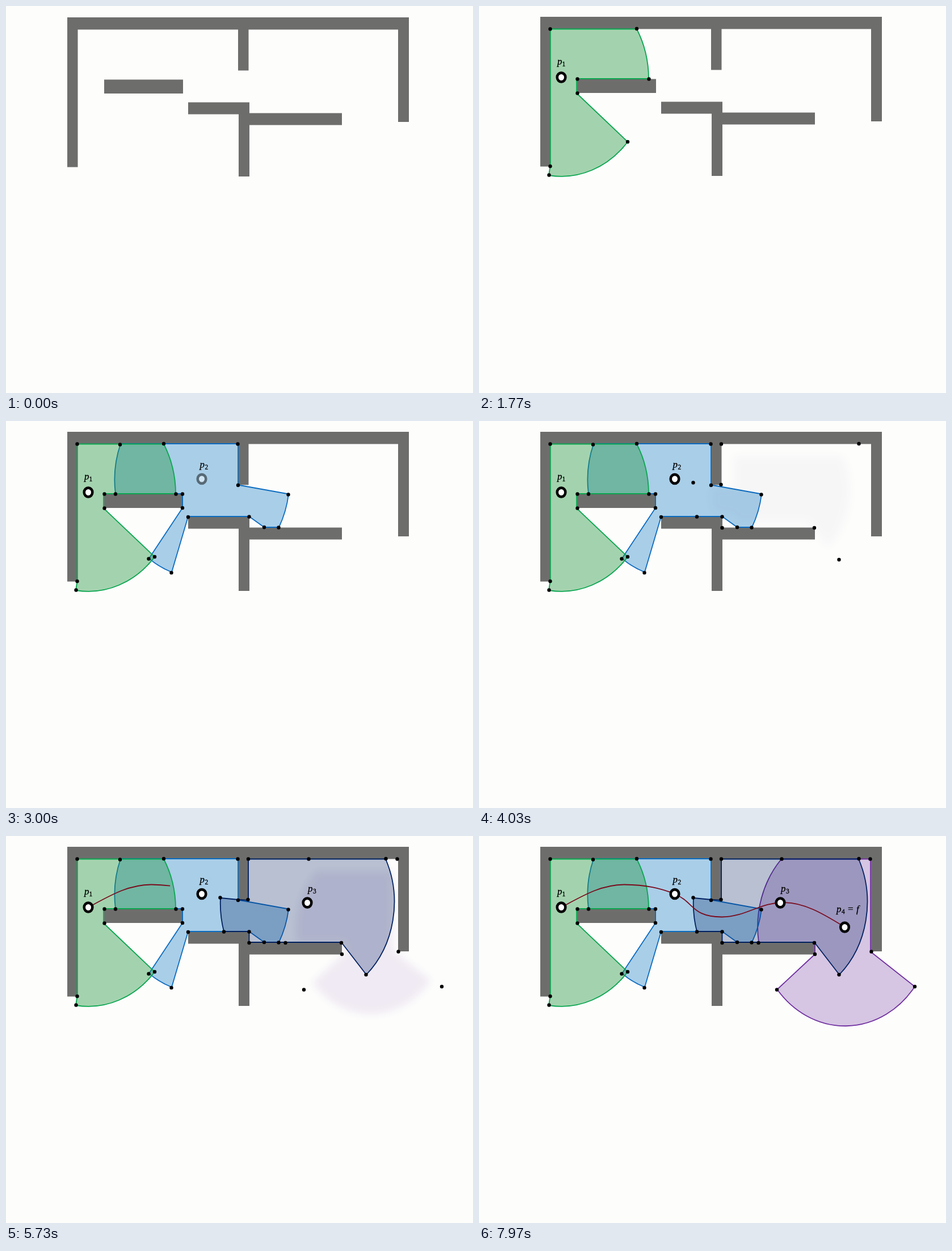
These frames come from a looping animation (823 by 681 pixels, 8000 ms). An HTML page:

```html
<!DOCTYPE html>
<html lang="en">
<head>
<meta charset="utf-8">
<title>Visibility regions along a path</title>
<style>
  /* One clock in ms drives everything */
  @property --t { syntax: '<number>'; inherits: true; initial-value: 0; }
  @keyframes clock { from { --t: 0; } to { --t: 8000; } }

  html, body { margin: 0; width: 100%; height: 100%; overflow: hidden; background: #fdfdfc; }
  svg { display: block; width: 823px; height: 681px; animation: clock 8s linear infinite; }

  /* --s: region starts to grow, --d: its corner dots appear */
  .a { --s: 815; --d: 930; }
  .b { --s: 2380; --d: 1980; }
  .c { --s: 3980; --d: 3580; }
  .d { --s: 5560; --d: 5160; }

  .walls {
    fill: #6d6e6c;
    transform: translateY(calc(1px - 1px * clamp(0, var(--t) - 930, 1)));
  }
  .zone {
    --p: clamp(0, (var(--t) - var(--s)) / 500, 1);
    opacity: min(var(--p), clamp(0, var(--t) - var(--d), 1));
    transform-box: fill-box;
    transform-origin: center;
    transform: scale(calc(.78 + .22 * var(--p)));
    filter: blur(calc((1 - var(--p)) * 12px));
    stroke-width: 1.8;
    stroke-linejoin: round;
    stroke-opacity: clamp(0, var(--p) * 5 - 4, 1);
  }
  .zone.a { fill: rgb(28 148 58 / .4); stroke: #0aa650; }
  .zone.b { fill: rgb(0 112 192 / .33); stroke: #0c6cc0; }
  .zone.c { fill: rgb(0 32 96 / .27); stroke: #002060; }
  .zone.d { fill: rgb(112 48 160 / .27); stroke: #7030a0; }

  .dots {
    opacity: clamp(0, var(--t) - var(--d), 1);
    stroke: #000;
    stroke-width: 6.4;
    stroke-linecap: round;
  }
  .label {
    opacity: clamp(0, (var(--t) - var(--s) - 250) / 390, 1);
    font: italic 17px "Liberation Serif", "Noto Serif", serif;
    stroke: #000;
    stroke-width: .3;
  }
  .label .sub { font-size: 11.5px; font-style: normal; }
  .ring {
    opacity: clamp(0, (var(--t) - var(--s) - 400) / 460, 1);
    fill: #fff;
    stroke: #000;
    stroke-width: 4.6;
  }
  .route {
    fill: none;
    stroke: #7a0a1c;
    stroke-width: 1.8;
    stroke-dasharray: 1 2;
    stroke-dashoffset: calc(1 - clamp(0, (var(--t) - 5560) / 600, 1));
  }
</style>
</head>
<body>
<svg viewBox="0 0 823 681">
  <path class="walls" d="M108 19H710V203H691V40.5H427.500V112.500H409V40.500H126.500V282.500H108Z
    M173 128.500H312V153H173Z M321 168.500H429V187.500H592V208.500H429V299H410V189.500H321Z"/>

  <path class="zone d" d="M533 40.500H690V203.500L768 265A154 174 0 0 1 525.500 270L592 208V187H493A154 174 0 0 1 533 40.500Z"/>
  <path class="zone b" d="M202 40H409V112.500L498 128.500A154 174 0 0 1 481 187H455L428.500 168H321L292 266A154 174 0 0 1 252 242L311 153V128H193A154 174 0 0 1 202 40Z"/>
  <path class="zone c" d="M427 40.500H669A154 174 0 0 1 635 244L591 187H428.500V168H384A154 174 0 0 1 378 109L409 112L427 113Z"/>
  <path class="zone a" d="M125.500 40.500H278A154 175 0 0 1 299 128H172V153.500L262 239A154 175 0 0 1 123 298L125.500 282Z"/>

  <path class="route" pathLength="1" d="M145 125.500C185 104 215 86 256 85.500C295 86 320 92 345 102
    C380 117 374 142 428 142.500C470 142 495 118 531 117.500C570 114 610 139 644 160"/>

  <path class="dots a" d="M125.500 40.500h0M278 40h0M173.500 128.500h0M299.500 128.500h0M173.500 153.500h0M262 239h0M125.500 282h0M123.500 297.500h0"/>
  <path class="dots b" d="M201 41.500h0M408.500 40.500h0M409 113h0M193 128.500h0M311 128.500h0M311 153h0M321 169h0M428.500 168.500h0M455 187h0M480.500 187.500h0M497.500 129.500h0M251.500 242.500h0M291.500 267h0"/>
  <path class="dots c" d="M427 40.500h0M669.500 40h0M426.500 112h0M377.500 108.500h0M384 168.500h0M428.500 188h0M591 188h0M634.500 244h0"/>
  <path class="dots d" d="M533.500 40.500h0M689.500 40.500h0M492.500 188h0M592 208h0M691.500 203.500h0M768 265h0M525 270.500h0"/>

  <text class="label a" x="138" y="103">p<tspan class="sub" x="146.500" y="106">1</tspan></text>
  <text class="label b" x="341.500" y="82">p<tspan class="sub" x="350.500" y="85">2</tspan></text>
  <text class="label c" x="532" y="98">p<tspan class="sub" x="541" y="101">3</tspan></text>
  <text class="label d" x="630" y="134">p<tspan class="sub" x="639" y="137">4</tspan><tspan x="649" y="134">=</tspan><tspan x="665" y="134">f</tspan></text>

  <ellipse class="ring a" cx="145" cy="125.500" rx="7.300" ry="7.900"/>
  <ellipse class="ring b" cx="345" cy="102" rx="7.300" ry="7.900"/>
  <ellipse class="ring c" cx="531" cy="117.500" rx="7.300" ry="7.900"/>
  <ellipse class="ring d" cx="644.500" cy="160.500" rx="7.300" ry="7.900"/>
</svg>
</body>
</html>
```
